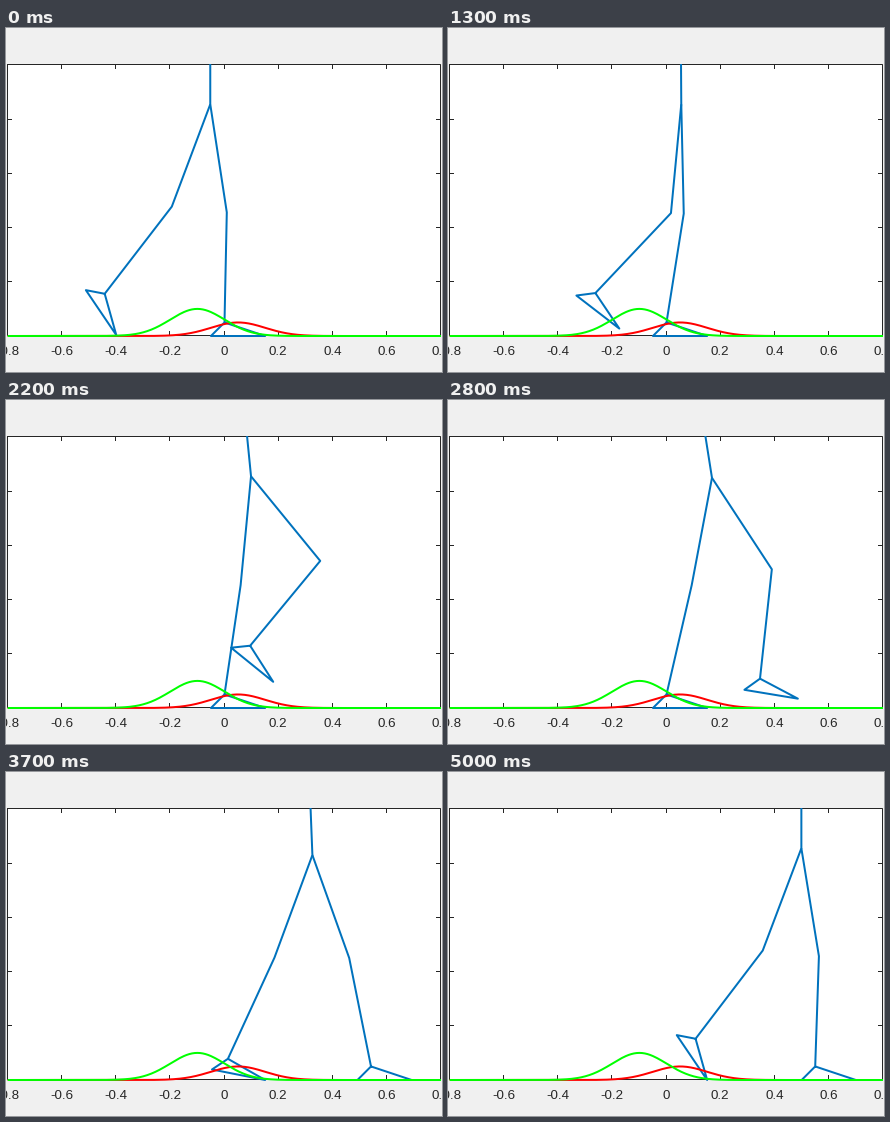
A matplotlib script for the animation above (5.1 s loop, 436 by 344 pixels).

```python
import numpy as np
import matplotlib.pyplot as plt
from matplotlib.animation import FuncAnimation
from matplotlib.patches import Rectangle

W, H, DPI = 436, 344, 100
FRAMES, STEP = 51, 100
SCALE, X0, GROUND = 271, 218.5, 308    # pixels per metre, pixel place of (0, 0)
LEFT, RIGHT, TOP, BOTTOM = 1.5, 434.5, 36.5, 307.5
THIGH, SHANK, TRUNK = 109.3, 110, 90
SOLE, TOE = 0.05 * SCALE, 0.15 * SCALE
INK, BLUE, RED, GREEN = "#262626", "#0072bd", "#ff0000", "#00ff00"
PX = 72 / DPI                          # one pixel in points

t = np.arange(FRAMES) * STEP / 1000


def track(keys):
    """Smooth, overshoot-free curve through {second: value}, held outside."""
    k = np.array(list(keys), float)
    v = np.array(list(keys.values()), float)
    h = np.diff(k)
    d = np.diff(v) / h
    m = np.concatenate([d[:1], np.zeros(len(k) - 2), d[-1:]])
    for i in range(1, len(k) - 1):
        if d[i - 1] * d[i] > 0:
            m[i] = 2 * d[i - 1] * d[i] / (d[i - 1] + d[i])
    now = np.clip(t, k[0], k[-1])
    i = np.clip(np.searchsorted(k, now, side="right") - 1, 0, len(h) - 1)
    s = (now - k[i]) / h[i]
    return ((1 + 2 * s) * (1 - s) ** 2 * v[i] + s * (1 - s) ** 2 * h[i] * m[i]
            + s * s * (3 - 2 * s) * v[i + 1] + s * s * (s - 1) * h[i] * m[i + 1])


def gauss(x, center, width):
    return np.exp(-0.5 * ((x - center) / width) ** 2)


def smooth(a, b):
    u = np.clip((t - a) / (b - a), 0, 1)
    return u * u * (3 - 2 * u)


def points(x, y):
    return np.stack([x, y], axis=1)


def turn(dx, dy, pitch):
    """Tip a foot offset toe-down by pitch degrees."""
    a = np.radians(pitch)
    return points(dx * np.cos(a) - dy * np.sin(a),
                  dx * np.sin(a) + dy * np.cos(a))


def hang(joint, angle, length):
    a = np.radians(angle)
    return joint + length * points(np.sin(a), np.cos(a))


# The hip lags behind a steady walk and dips around the foot's landing
dip = np.sin(np.pi * np.clip((t - 2.5) / 2, 0, 1)) ** 2
hip = points(204.6 + 29.8 * t - 26.3 * gauss(t, 2.45, 0.83), 76.3 + 7.5 * dip)
head = hang(hip, 180 + 9 * gauss(t, 2.75, 0.57), TRUNK)

# Supporting leg: the foot rolls over its toe
roll = track({2.9: 0, 3.7: 11.2, 4.5: 40.9, 5: 55.9})
stance_ankle = [X0 + TOE, GROUND] - turn(TOE, SOLE, roll)
stance_knee = hang(hip, track({0: 8.7, 1.3: 1.3, 2.8: -10.7, 3.7: -20.3,
                               4.5: -22.6, 5: -20.7}), THIGH)

# Swinging leg: the thigh is thrown forward, then settles until landing
settle = np.exp(-np.maximum(t - 2.4, 0) / 1.72)
swing_knee = hang(hip, (-20.6 + 62.5 * smooth(0.78, 2.4)) * settle, THIGH)
ankle_x = track({0: 98.7, 0.6: 104.8, 1.3: 147.4, 2.8: 312, 3.3: 356.3,
                 3.7: 365, 5: 367.2})
drop = np.sqrt(SHANK ** 2 - (ankle_x - swing_knee[:, 0]) ** 2)
flat = GROUND - SOLE
ankle_y = np.where(t < 3.6, np.minimum(swing_knee[:, 1] + drop, flat), flat)
swing_ankle = points(ankle_x, ankle_y)
pitch = track({0: 55.9, 1.3: 37.6, 2.2: 39, 2.8: 9.4, 3.5: 0})


def leg(knee, ankle, tilt):
    heel = ankle + turn(-SOLE, SOLE, tilt)
    toe = ankle + turn(TOE, SOLE, tilt)
    return [hip, knee, ankle, heel, toe, ankle]


paths = [np.stack(joints, axis=1) for joints in (
    [head] + leg(stance_knee, stance_ankle, roll),
    leg(swing_knee, swing_ankle, pitch))]

fig = plt.figure(figsize=(W / DPI, H / DPI), dpi=DPI, facecolor="#f0f0f0")
ax = fig.add_axes([0, 0, 1, 1])
ax.set_xlim(0, W)
ax.set_ylim(H, 0)
ax.axis("off")

ax.add_patch(Rectangle((LEFT, TOP), RIGHT - LEFT, BOTTOM - TOP, fc="white", ec="none"))
clip = Rectangle((1, 36), 434, 276, transform=ax.transData)


def rule(x, y):
    ax.plot(x, y, color=INK, lw=PX, solid_capstyle="butt",
            solid_joinstyle="miter", snap=False, zorder=2)


rule([LEFT, RIGHT, RIGHT, LEFT, LEFT], [TOP, TOP, BOTTOM, BOTTOM, TOP])
for i in range(-4, 5):
    mid = (LEFT + RIGHT) / 2 + i * (RIGHT - LEFT) / 8
    x = np.floor(mid) + 0.5
    if abs(i) < 4:
        rule([x, x], [TOP, TOP + 4.5])
        rule([x, x], [BOTTOM, BOTTOM - 4.5])
    label = f"{0.2 * i:.1f}" if i else "0"
    ax.text(mid, 327.3, label, ha="center", va="baseline", color=INK,
            family="Liberation Sans", fontsize=13.33 * PX)
for i in range(1, 5):
    y = np.floor(GROUND - 0.2 * i * SCALE) + 0.5
    rule([LEFT, LEFT + 4.5], [y, y])
    rule([RIGHT, RIGHT - 4.5], [y, y])


def curve(color, z):
    line, = ax.plot([], [], color=color, lw=2 * PX, zorder=z, snap=False,
                    solid_joinstyle="round", solid_capstyle="butt")
    line.set_clip_path(clip)
    return line


def bell(center, peak, color, z):
    x = np.linspace(-0.8, 0.8, 321)
    y = peak * gauss(x, center, 0.1)
    curve(color, z).set_data(X0 + x * SCALE, GROUND - y * SCALE)


bell(0.05, 0.05, RED, 4)
bell(-0.1, 0.1, GREEN, 5)
limbs = [curve(BLUE, 3) for _ in paths]


def draw(i):
    for line, path in zip(limbs, paths):
        line.set_data(path[i, :, 0], path[i, :, 1])
    return limbs


anim = FuncAnimation(fig, draw, frames=FRAMES, interval=STEP, repeat=True,
                     repeat_delay=0)
plt.show()
```
